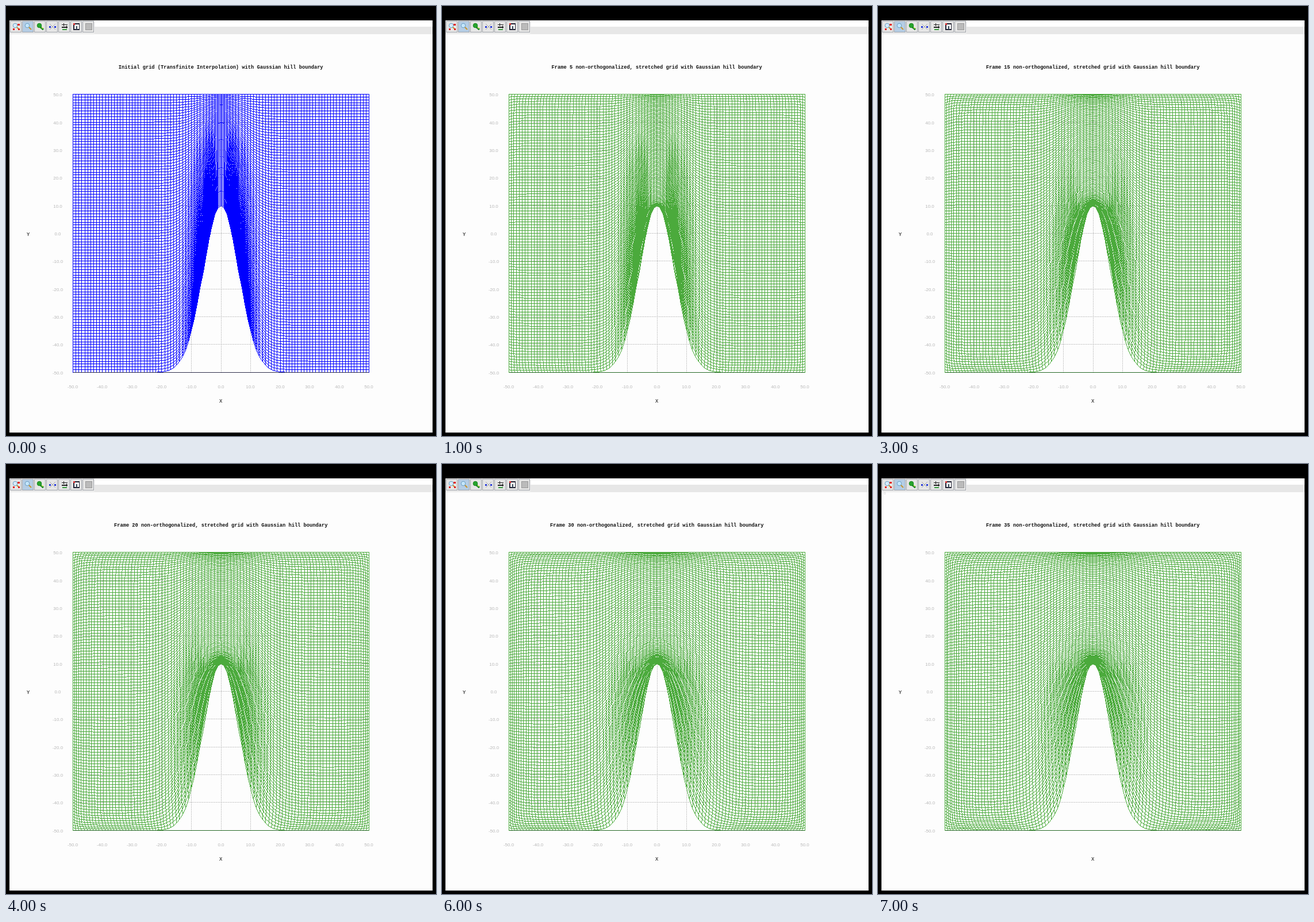
Animation of 748x748 px, one loop 8000 ms. Source, as an HTML page with a canvas:

```html
<!DOCTYPE html>
<html lang="en">
<head>
<meta charset="utf-8">
<title>Elliptic grid smoothing</title>
<style>
html, body { margin: 0; width: 100%; height: 100%; overflow: hidden; background: #000; }
canvas { display: block; }
</style>
</head>
<body>
<canvas id="stage" width="748" height="748"></canvas>
<script>
const SIZE = 748, N = 100, ROW = N + 1, STEP_MS = 1000, STATES = 8, SWEEPS = 5;
const PULL = 0.12;                       // stretching strength towards the borders
const ctx = document.getElementById('stage').getContext('2d');
const px = x => Math.floor(116.4 + (x + 50) * 5.152);
const py = y => Math.floor(637.35 - (y + 50) * 4.837);
const id = (i, j) => j * ROW + i;
const ticks = Array.from({ length: 11 }, (_, i) => i * 10 - 50);

// Transfinite interpolation between a Gaussian hill and a flat top
function initialGrid() {
  const x = new Float64Array(ROW ** 2), y = x.slice();
  for (let j = 0; j <= N; j++) for (let i = 0; i <= N; i++) {
    const k = id(i, j), hill = -50 + 60 * Math.exp(-((i - 50) ** 2) / 72);
    x[k] = i - 50;
    y[k] = hill + (50 - hill) * j / N;
  }
  return { x, y };
}

// Solve one grid column of the Winslow equations with the Thomas algorithm
function relaxColumn(i, { x, y }) {
  const c = new Float64Array(ROW), dx = c.slice(), dy = c.slice();
  dx[0] = x[i];
  dy[0] = y[i];
  for (let j = 1; j < N; j++) {
    const k = id(i, j);
    const dXi = a => (a[k + 1] - a[k - 1]) / 2;
    const dEta = a => (a[k + ROW] - a[k - ROW]) / 2;
    const xs = dXi(x), ys = dXi(y), xt = dEta(x), yt = dEta(y);
    const alpha = xt * xt + yt * yt, beta = xs * xt + ys * yt, gamma = xs * xs + ys * ys;
    const p = PULL * (i / 50 - 1), q = PULL * (j / 50 - 1);
    const known = (a, as, at) => alpha * (a[k + 1] + a[k - 1]) + p * as + q * at
      - beta / 2 * (a[k + ROW + 1] - a[k + ROW - 1] - a[k - ROW + 1] + a[k - ROW - 1]);
    const pivot = 2 * (alpha + gamma) - gamma * c[j - 1];
    c[j] = gamma / pivot;
    dx[j] = (known(x, xs, xt) + gamma * dx[j - 1]) / pivot;
    dy[j] = (known(y, ys, yt) + gamma * dy[j - 1]) / pivot;
  }
  for (let j = N - 1; j > 0; j--) {
    const k = id(i, j);
    x[k] = dx[j] + c[j] * x[k + ROW];
    y[k] = dy[j] + c[j] * y[k + ROW];
  }
}

// Alternate the sweep direction so that the mesh stays symmetric
function smooth(grid, sweep) {
  for (let i = 1; i < N; i++) relaxColumn(sweep % 2 ? N - i : i, grid);
}

// Aliased one-pixel mesh on its own layer
function meshLayer({ x, y }, color) {
  const layer = document.createElement('canvas');
  layer.width = layer.height = SIZE;
  const c = layer.getContext('2d'), image = c.createImageData(SIZE, SIZE);
  const pixels = new Uint32Array(image.data.buffer);
  const line = (a, b) => {
    const x0 = px(x[a]), y0 = py(y[a]), dx = px(x[b]) - x0, dy = py(y[b]) - y0;
    const n = Math.max(Math.abs(dx), Math.abs(dy), 1);
    for (let s = 0; s <= n; s++)
      pixels[Math.round(y0 + dy * s / n) * SIZE + Math.round(x0 + dx * s / n)] = color;
  };
  for (let j = 0; j <= N; j++) for (let i = 0; i <= N; i++) {
    if (i < N) line(id(i, j), id(i + 1, j));
    if (j < N) line(id(i, j), id(i, j + 1));
  }
  c.putImageData(image, 0, 0);
  return layer;
}

function rect(color, x, y, w, h) {
  ctx.fillStyle = color;
  ctx.fillRect(x, y, w, h);
}

function text(str, x, y, font, color) {
  ctx.font = font;
  ctx.fillStyle = color;
  ctx.textAlign = 'center';
  ctx.fillText(str, x, y);
}

function stroke(color, width, points) {
  ctx.strokeStyle = color;
  ctx.lineWidth = width;
  ctx.beginPath();
  points.forEach(([x, y]) => ctx.lineTo(x, y));
  ctx.stroke();
}

function disc(x, y, r, fill, edge) {
  ctx.beginPath();
  ctx.arc(x, y, r, 0, 7);
  ctx.fillStyle = fill;
  ctx.fill();
  ctx.strokeStyle = edge;
  ctx.lineWidth = 1;
  ctx.stroke();
}

function lens(x, y, fill) {
  stroke('#c8942c', 2, [[x + 2, y + 2], [x + 7, y + 7]]);
  disc(x, y, 3.8, fill, '#6a9fc4');
}

function toolbar() {
  rect('#fff', 6, 25, 736, 11);
  rect('#e7e7e7', 6, 36, 736, 13);
  rect('#eee', 6, 25, 148, 23);
  for (let i = 0; i < 7; i++) {
    const x = 7 + i * 21;
    rect('#a0a4aa', x, 26, 20, 20);
    rect(i === 1 ? '#b5cde5' : '#e6e6e6', x + 1, 27, 18, 18);
  }
  lens(16, 34, '#d5ecfa');
  rect('#e02020', 20, 31, 4, 3);
  rect('#e02020', 12, 39, 3, 3);
  rect('#e02020', 21, 39, 3, 3);
  lens(37, 34, '#c5e6fb');
  stroke('#16851c', 3, [[59, 36], [65, 41]]);
  disc(58, 34, 3.8, '#27a52d', '#16851c');
  rect('#c8e46a', 62, 37, 3, 2);
  stroke('#aaa', 1, [[76, 31], [86, 41]]);
  stroke('#aaa', 1, [[86, 31], [76, 41]]);
  for (const x of [75, 84]) rect('#2438d8', x, 35, 3, 3);
  rect('#222', 97, 32, 10, 1);
  rect('#222', 97, 36, 10, 2);
  rect('#222', 100, 30, 1, 5);
  rect('#222', 105, 34, 1, 5);
  rect('#3b9d42', 98, 40, 8, 2);
  rect('#223', 117, 30, 11, 12);
  rect('#fff', 119, 32, 8, 8);
  rect('#d33', 117, 30, 3, 3);
  rect('#345', 122, 35, 2, 6);
  rect('#999', 138, 30, 12, 12);
  rect('#bbb', 139, 31, 10, 10);
}

const layers = [], grid = initialGrid();
for (let s = 0; s < STATES; s++) {
  layers.push(meshLayer(grid, s ? 0xff3caa4b : 0xffff0000));
  for (let k = 0; k < SWEEPS; k++) smooth(grid, s * SWEEPS + k);
}

function draw(state) {
  const bare = state === 5 || state === 7;   // the x axis drops out here
  const mono = '8.73px "Liberation Mono", monospace', sans = '8px "Liberation Sans", sans-serif';
  rect('#000', 0, 0, SIZE, SIZE);
  rect('#fdfdfd', 6, 25, 736, 717);
  toolbar();
  if (state === 7) text('0', 12, 53, '6px "Liberation Sans", sans-serif', '#ccc');
  ctx.setLineDash([2, 1]);
  for (const t of ticks) {
    const x = px(t) + 0.5, y = py(t) + 0.5;
    stroke('#c4c4c4', 1, [[116, y], [632, y]]);
    if (!bare) stroke('#c4c4c4', 1, [[x, 153], [x, 637]]);
  }
  ctx.setLineDash([]);
  ctx.drawImage(layers[state], 0, 0);
  rect(state ? '#286a28' : '#30304c', 117, 637, 514, 1);
  for (const t of ticks) {
    text(t.toFixed(1), 90, py(t) + 3.5, sans, '#b8b8b8');
    if (!bare || (state === 5 && t === -50)) text(t.toFixed(1), px(t), 665, sans, '#b8b8b8');
  }
  text('X', 373.5, 690, mono, '#000');
  text('Y', 38.5, 399.5, mono, '#000');
  const title = state
    ? `Frame ${state * SWEEPS} non-orthogonalized, stretched grid with Gaussian hill boundary`
    : 'Initial grid (Transfinite Interpolation) with Gaussian hill boundary';
  text(title, 373.7, 108.5, 'bold ' + mono, '#111');
}

function tick() {
  draw(Math.floor(performance.now() / STEP_MS) % STATES);
  requestAnimationFrame(tick);
}
tick();
</script>
</body>
</html>
```
